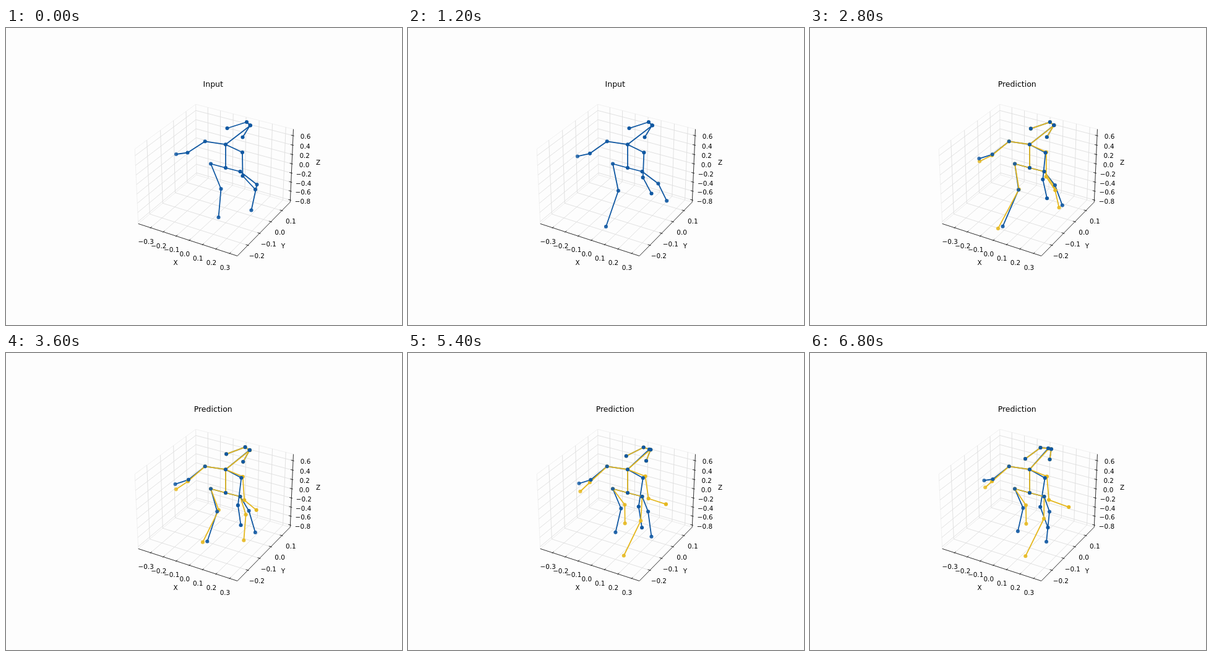
Write an HTML page with a canvas that moves like this. It is 640 px wide and 480 px high and loops after 7 s.

```html
<!DOCTYPE html>
<html lang="en">
<head>
<meta charset="utf-8">
<title>Pose prediction</title>
<style>
  html, body { margin: 0; width: 100%; height: 100%; overflow: hidden; background: #fdfdfd; }
  canvas { display: block; }
</style>
</head>
<body>
<canvas id="stage" width="640" height="480"></canvas>
<script>
const ctx = document.getElementById('stage').getContext('2d');
const LOOP = 7000, STEP = 200, LAST = 6.8, PREDICT_AT = 2;
const BLUE = '#1058a2', YELLOW = '#e5b820', GRID = '#dedede', PANE = '#efefef', INK = '#111';

// ---- Axes: a perspective box seen from elevation 30°, azimuth -60° ----

// Box fractions (0..1 on each axis) to screen
function project([fx, fy, fz]) {
  const x = (fx - 0.5) * 1.1428, y = (fy - 0.5) * 1.1428, z = (fz - 0.5) * 0.8571;
  const scale = 1606 / (10 - (0.433 * x - 0.75 * y + 0.5 * z));
  return [338.7 + (0.866 * x + 0.5 * y) * scale,
          240.2 - (-0.25 * x + 0.433 * y + 0.866 * z) * scale];
}

function line(points, color, width) {
  ctx.beginPath();
  points.forEach(p => ctx.lineTo(...p));
  ctx.strokeStyle = color;
  ctx.lineWidth = width;
  ctx.stroke();
}

function text(str, x, y, size = 10.42) {
  ctx.font = `${size}px "DejaVu Sans", sans-serif`;
  ctx.textAlign = 'center';
  ctx.fillStyle = '#000';
  ctx.fillText(str, x, y + size * 0.365);
}

// Limits, tick range in tenths, grid line, tick point d outside the axis, label offset
const AXES = [
  { min: -0.398, max: 0.356, from: -3, to: 3, by: 1, offset: [-7.5, 22.4],
    grid: f => [[f, 0, 0], [f, 1, 0], [f, 1, 1]], tick: (f, d) => [f, -d, 0] },
  { min: -0.286, max: 0.179, from: -2, to: 1, by: 1, offset: [14.5, 17],
    grid: f => [[1, f, 0], [0, f, 0], [0, f, 1]], tick: (f, d) => [1 + d, f, 0] },
  { min: -0.847, max: 0.734, from: -8, to: 6, by: 2, offset: [20, 1.7],
    grid: f => [[0, 0, f], [0, 1, f], [1, 1, f]], tick: (f, d) => [1 + d, 1, f] }
];

function eachTick({ min, max, from, to, by }, visit) {
  for (let n = from; n <= to; n += by) visit((n / 10 - min) / (max - min), n / 10);
}

function drawAxes() {
  for (const { grid } of AXES) {
    for (const f of [0, 1]) line(grid(f).map(project), PANE, 0.9);
  }
  for (const axis of AXES) {
    eachTick(axis, f => line(axis.grid(f).map(project), GRID, 0.9));
  }
  for (const axis of AXES) {
    const at = (f, d) => project(axis.tick(f, d));
    line([at(0, 0), at(1, 0)], INK, 0.85);
    eachTick(axis, (f, value) => {
      line([at(f, 0.01), at(f, -0.02)], INK, 0.85);
      const [x, y] = at(f, 0);
      text(value.toFixed(1).replace('-', '\u2212'), x + axis.offset[0], y + axis.offset[1]);
    });
  }
  text('X', 274, 379);
  text('Y', 448, 352.5);
  text('Z', 504.5, 217.5);
}

// ---- Motion: every joint is a start point plus shared signals times a reach ----

// Rises from 0 to 1 at the peak, then dies away; later peaks are narrower
function bump(t, peak) {
  const x = t / peak;
  return (x * Math.exp(1 - x)) ** (1.3 * peak * peak);
}

function signalsAt(t, predicted) {
  const u = t / LAST;
  const angle = predicted ? Math.PI / 2 * (t - PREDICT_AT) / 3.6 : 0;
  return {
    settle: Math.sin(Math.PI / 2 * u),
    turn: u ** 3,
    strideL: bump(t, 2),
    strideR: bump(t, 1.2),
    armError: Math.sin(angle),
    legError: Math.sin(angle) ** 2,
    lag: Math.max(0, Math.sin(2 * angle))
  };
}

const JOINTS = {
  earL: { at: [357.5, 162], turn: [-9.5, 9] },
  eyeL: { at: [389, 152], turn: [-16.5, 1] },
  nose: { at: [395, 157.5], turn: [-10, -3.5], legError: [1.5, 0.7] },
  eyeR: { at: [394.5, 157.2], turn: [-4.5, -2] },
  earR: { at: [382.5, 176.5], turn: [5, -4.5] },

  neck: { at: [355, 188.2] },
  pelvis: { at: [355, 226] },
  hipL: { at: [331, 219.5], fade: 0.9 },
  hipR: { at: [378.5, 232] },

  shoulderL: { at: [321.7, 183.3], fade: 0.94 },
  elbowL: { at: [293.5, 201.5], settle: [2, 5], turn: [0, -2.5], armError: [-1.5, 4], fade: 0.95 },
  wristL: { at: [275, 204], settle: [-4, 13], turn: [10.5, -11], armError: [2, 13], fade: 0.82 },
  shoulderR: { at: [382, 201], settle: [-2.3, 1], armError: [3.7, -2.7] },
  elbowR: { at: [382.5, 239], settle: [-10.3, 9.7], armError: [16, -13] },
  wristR: { at: [403, 261], settle: [-35, 24], turn: [16.5, -3], armError: [39, -38] },

  kneeL: { at: [347.5, 260], settle: [-3, -9.5], strideL: [-12, 10], legError: [6, -6], fade: 0.9 },
  ankleL: { at: [343.5, 306], settle: [-7.5, -18], strideL: [-38.2, 35.5],
            legError: [18, -16], lag: [-15, 8], fade: 0.9 },
  kneeR: { at: [405.5, 253], settle: [-18.5, 3.5], strideR: [4, -2.5],
           legError: [-12, 15], fade: 0.92 },
  ankleR: { at: [396.5, 294.5], settle: [8.4, -6], turn: [-22.9, 16.5], strideR: [19.5, -13.6],
            legError: [-45, 31], fade: 0.9 }
};

const CHAINS = [
  'earL eyeL nose eyeR earR', 'nose neck pelvis',
  'neck shoulderL elbowL wristL', 'neck shoulderR elbowR wristR',
  'pelvis hipL kneeL ankleL', 'pelvis hipR kneeR ankleR'
].map(chain => chain.split(' '));

function poseAt(t, predicted) {
  const signals = Object.entries(signalsAt(t, predicted));
  const pose = {};
  for (const [name, joint] of Object.entries(JOINTS)) {
    pose[name] = joint.at.map((start, axis) => signals.reduce(
      (sum, [signal, level]) => sum + (joint[signal] ? joint[signal][axis] * level : 0), start));
  }
  return pose;
}

function drawBones(pose, color) {
  CHAINS.forEach(chain => line(chain.map(name => pose[name]), color, 1.8));
}

// Distant joints are a little transparent
function drawJoints(pose, color) {
  ctx.fillStyle = color;
  for (const name in pose) {
    ctx.globalAlpha = JOINTS[name].fade || 1;
    ctx.beginPath();
    ctx.arc(...pose[name], 3.05, 0, 2 * Math.PI);
    ctx.fill();
  }
  ctx.globalAlpha = 1;
}

function draw(ms) {
  const t = Math.floor((ms % LOOP) / STEP) * STEP / 1000;
  const predicting = t >= PREDICT_AT;
  const actual = poseAt(t, false);

  ctx.fillStyle = '#fdfdfd';
  ctx.fillRect(0, 0, 640, 480);
  ctx.lineJoin = 'round';
  drawAxes();
  text(predicting ? 'Prediction' : 'Input', 334.7, 90, 12.5);
  drawBones(actual, BLUE);
  if (predicting) {
    const predicted = poseAt(t, true);
    drawBones(predicted, YELLOW);
    drawJoints(predicted, YELLOW);
  }
  drawJoints(actual, BLUE);
}

const start = performance.now();
function tick() {
  draw(performance.now() - start);
  requestAnimationFrame(tick);
}
tick();
</script>
</body>
</html>
```
